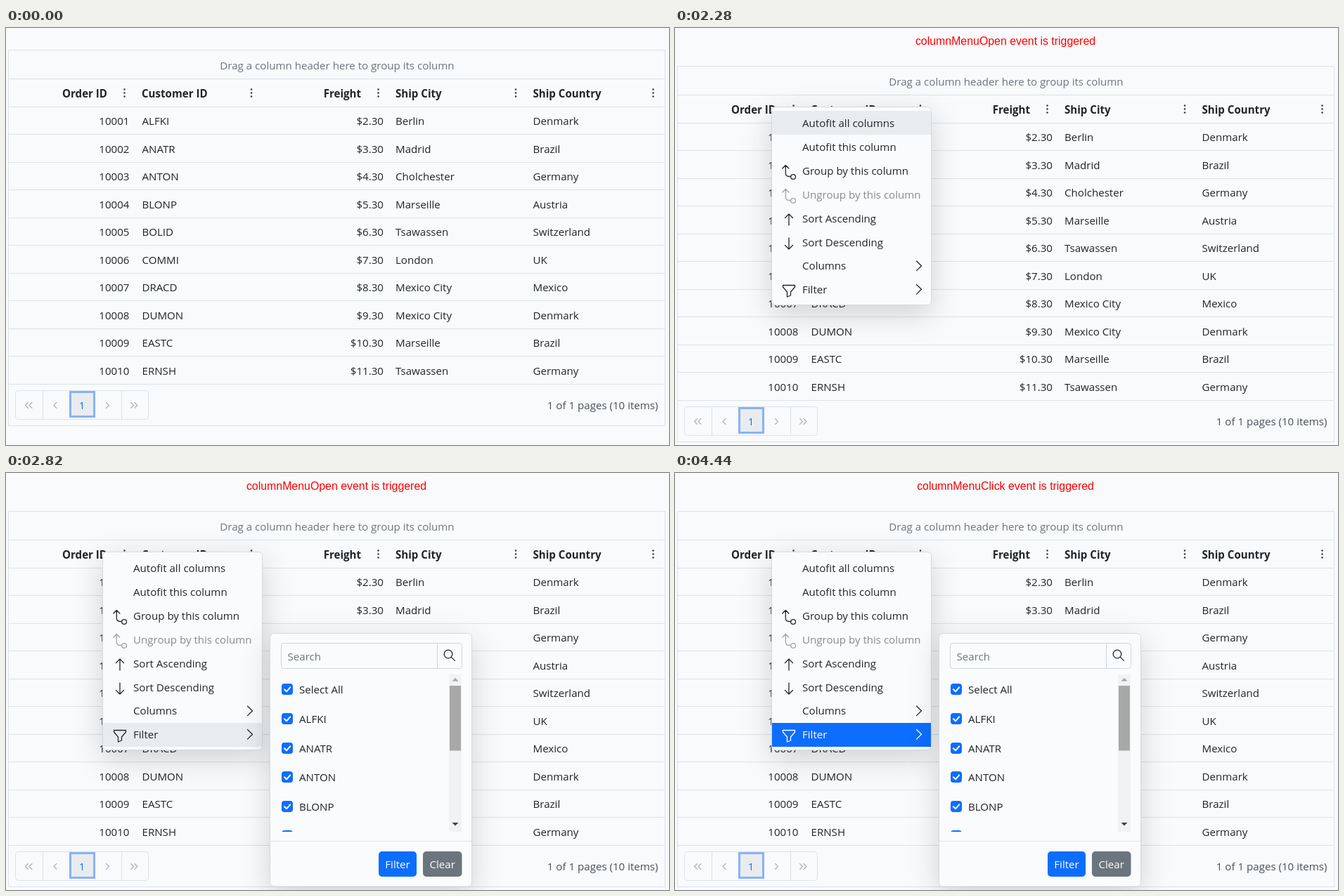
These frames come from a looping animation (943x594 px, 5.34 s). An HTML page:

```html
<!DOCTYPE html>
<html lang="en">
<head>
<meta charset="utf-8">
<title>Grid column menu</title>
<style>
  html, body { margin: 0; width: 100%; height: 100%; overflow: hidden; background: #f8fafc; }
  svg { display: block; width: 100%; height: 100%; }
  text { font: 15.1px "Open Sans", "Noto Sans", sans-serif; fill: #212529; white-space: pre; }
  .head { font-weight: 700; }
  .end { text-anchor: end; }
  .mid { text-anchor: middle; }
  .dim { fill: #6c757d; }
  .off { fill: #858b91; }
  .light { fill: #fff; }
  .note { font: 15.9px "Liberation Sans", Arial, sans-serif; fill: #f00; text-anchor: middle; }
  .rule { stroke: #dee2e6; fill: none; }
  .icon { stroke: #212529; stroke-width: 1.3; fill: none; stroke-linecap: round; stroke-linejoin: round; }
  .faint { stroke: #a9b0b7; stroke-width: 1.1; }
  .popup { fill: #fafbfd; stroke: #d6d9dc; filter: drop-shadow(0 12px 20px rgba(0, 0, 0, .16)); }
</style>
</head>
<body>
<svg id="stage" viewBox="0 0 943 594" preserveAspectRatio="none"></svg>
<script>
const LOOP = 5340;
const MENU = { x: 137.5, y: 112.5, w: 227, h: 282 };
const SUB = { x: 365.5, y: 321.5, w: 146, h: 181 };
const BLUE = '#0d6efd';

const text = (x, y, s, cls = '', more = '') => `<text x="${x}" y="${y}" class="${cls}" ${more}>${s}</text>`;
const rect = (x, y, w, h, fill, more = '') =>
  `<rect x="${x}" y="${y}" width="${w}" height="${h}" fill="${fill}" ${more}/>`;
const path = (d, cls = 'icon', more = '') => `<path d="${d}" class="${cls}" ${more}/>`;
const group = (id, body) => `<g id="${id}">${body}</g>`;

const check = (x, y) => rect(x, y, 16, 16, BLUE, 'rx="4"') +
  path(`M${x + 4} ${y + 8.3}l3 3 5.2-6`, 'icon', 'style="stroke:#fff;stroke-width:2"');

const orders = [
  ['ALFKI', 'Berlin', 'Denmark'], ['ANATR', 'Madrid', 'Brazil'],
  ['ANTON', 'Cholchester', 'Germany'], ['BLONP', 'Marseille', 'Austria'],
  ['BOLID', 'Tsawassen', 'Switzerland'], ['COMMI', 'London', 'UK'],
  ['DRACD', 'Mexico City', 'Mexico'], ['DUMON', 'Mexico City', 'Denmark'],
  ['EASTC', 'Marseille', 'Brazil'], ['ERNSH', 'Tsawassen', 'Germany']
];

function pager() {
  const arrow = (x, dir) => path(`M${x + 2 * dir} 533.5l${-4 * dir} 4 ${4 * dir} 4`, 'icon faint');
  return rect(13.5, 516.5, 189, 41, 'none', 'class="rule" rx="4"') +
    path('M52.5 516.5v41M164.5 516.5v41', 'rule') +
    rect(91.5, 518.5, 34, 35, '#e9ecef', 'stroke="#86b3fb" stroke-width="3"') +
    text(108, 542.5, '1', 'mid', `style="fill:${BLUE}"`) +
    arrow(29.5, 1) + arrow(35, 1) + arrow(70, 1) +
    arrow(144.5, -1) + arrow(179.5, -1) + arrow(185, -1) +
    text(927.5, 543, '1 of 1 pages (10 items)', 'end', 'style="fill:#495057"');
}

function grid() {
  const lineY = i => Math.floor(112.2 + i * 39.5) + .5;
  let s = rect(3.5, 31.5, 934, 535, 'none', 'class="rule"') +
    text(471, 59, 'Drag a column header here to group its column', 'mid dim') +
    path('M4 72.5H937', 'rule');
  s += text(144, 99, 'Order ID', 'head end') + text(193, 99, 'Customer ID', 'head') +
    text(505, 99, 'Freight', 'head end') + text(554, 99, 'Ship City', 'head') +
    text(749.5, 99, 'Ship Country', 'head');
  for (const x of [168.5, 349, 529.5, 725, 920.5])
    for (const y of [87.5, 92.5, 97.5]) s += `<circle cx="${x}" cy="${y}" r="1.25" fill="#33383d"/>`;
  for (let i = 0; i <= orders.length; i++) s += path(`M4 ${lineY(i)}H937`, 'rule');
  orders.forEach(([id, city, country], i) => {
    const y = Math.round(138.4 + i * 39.5);
    s += text(175.5, y, 10001 + i, 'end') + text(193.5, y, id) +
      text(537, y, `$${2 + i}.30`, 'end') + text(554, y, city) + text(749.5, y, country);
  });
  return s + pager();
}

const itemY = i => 118 + i * 34;

function menuItems() {
  const labels = ['Autofit all columns', 'Autofit this column', 'Group by this column',
    'Ungroup by this column', 'Sort Ascending', 'Sort Descending', 'Columns', 'Filter'];
  const tree = 'M152.8 200l4.5-4.5 4.5 4.5M157.3 195.5v11q0 5 5 5h2' +
    'M171.5 212a3.4 3.4 0 1 1-6.8 0a3.4 3.4 0 1 1 6.8 0';
  let s = rect(138, 0, 226, 34, '#e9ecef', 'id="hover"');
  labels.forEach((label, i) => {
    s += text(181, Math.round(141 + i * 33.9), label, i === 3 ? 'off' : '', `id="item${i}"`);
  });
  return s + path(tree) +
    path(tree, 'icon', 'transform="translate(0 34)" style="stroke:#a0a5aa"') +
    path('M162 281v-16m-5.5 5.5l5.5-5.5 5.5 5.5M162 299v16m-5.5-5.5l5.5 5.5 5.5-5.5') +
    path('M343.5 332l7 6.8-7 6.8') +
    group('filterIcons', path('M343.5 365.5l7 6.8-7 6.8') +
      path('M153.5 366.5h17v2.5l-6 7v5l-5 2v-7l-6-7z'));
}

function subItems() {
  return ['Order ID', 'Customer ID', 'Freight', 'Ship City', 'Ship Country']
    .map((label, i) => check(378, 335 + i * 34) + text(408, 349 + i * 34, label)).join('');
}

const popup = (id, b, body) =>
  `<clipPath id="${id}Clip">${rect(b.x, b.y, b.w, b.h, '#000', `id="${id}Mask"`)}</clipPath>` +
  group(id, rect(b.x, b.y, b.w, b.h, '#fff', `class="popup" rx="5" id="${id}Box"`) +
    `<g clip-path="url(#${id}Clip)">${body}</g>`);

function panel() {
  const list = ['Select All', ...orders.slice(0, 5).map(o => o[0])]
    .map((label, i) => {
      const y = Math.round(300 + i * 41.8);
      return check(392, y) + text(417, y + 14, label);
    }).join('');
  return rect(375.5, 228.5, 287, 360.5, '#fff', 'class="popup" rx="6"') +
    rect(391.5, 242.5, 257, 36, 'none', 'stroke="#ced4da" rx="4"') +
    path('M613.5 242.5v36', 'rule', 'style="stroke:#ced4da"') +
    text(400.5, 267, 'Search', 'dim') +
    '<circle cx="629" cy="258" r="5.8" class="icon"/>' + path('M633.4 262.4l5 5') +
    `<clipPath id="listClip">${rect(376, 287, 254, 224, '#000')}</clipPath>` +
    `<g clip-path="url(#listClip)">${list}</g>` +
    rect(630, 287, 18, 224, '#f1f2f4') + rect(631, 303, 16, 92.5, '#a8a8a8') +
    '<path d="M634.5 296.5h9l-4.5-4.5z" fill="#a3a3a3"/>' +
    '<path d="M634.5 498h9l-4.5 4.5z" fill="#404040"/>' +
    path('M376 524.5H662', 'rule') +
    rect(530, 539, 54, 36, BLUE, 'rx="5"') + text(557, 562.5, 'Filter', 'mid light') +
    rect(593, 539, 55.5, 36, '#6c757d', 'rx="5"') + text(620.7, 562.5, 'Clear', 'mid light');
}

const stage = document.getElementById('stage');
stage.innerHTML = group('grid', grid()) + text(470, 24, '', 'note', 'id="note"') +
  popup('menu', MENU, menuItems()) + popup('sub', SUB, subItems()) + group('panel', panel());

const el = id => document.getElementById(id);
const show = (id, on) => { el(id).style.display = on ? '' : 'none'; };
// Value of the last [start, value] step that has begun.
const step = (steps, t) => steps.reduce((v, [at, next]) => (t >= at ? next : v), steps[0][1]);

const menuSteps = [[0, 0], [1560, 20], [1620, 165], [1680, MENU.h]];
const subSteps = [[0, 0], [2700, 85], [2760, SUB.h], [2820, 0]];
const hoverSteps = [[0, -1], [2280, 0], [2400, 1], [2520, 2], [2640, 5], [2700, 6], [2820, 7]];

function unroll(id, h) {
  show(id, h > 0);
  el(id + 'Box').setAttribute('height', h);
  el(id + 'Mask').setAttribute('height', h);
}

function draw(t) {
  const opened = t >= 1560, clicked = t >= 3240;
  const hover = step(hoverSteps, t);
  el('grid').setAttribute('transform', `translate(0 ${opened ? 23 : 0})`);
  el('note').textContent = opened ? `columnMenu${clicked ? 'Click' : 'Open'} event is triggered` : '';
  unroll('menu', step(menuSteps, t));
  unroll('sub', step(subSteps, t));
  show('hover', hover >= 0);
  el('hover').setAttribute('y', itemY(hover));
  el('hover').setAttribute('fill', clicked ? BLUE : '#e9ecef');
  el('item7').style.fill = clicked ? '#fff' : '';
  for (const p of el('filterIcons').children) p.style.stroke = clicked ? '#fff' : '';
  show('panel', t >= 2820);
}

const start = performance.now();
function tick() {
  draw((performance.now() - start) % LOOP);
  requestAnimationFrame(tick);
}
tick();
</script>
</body>
</html>
```
